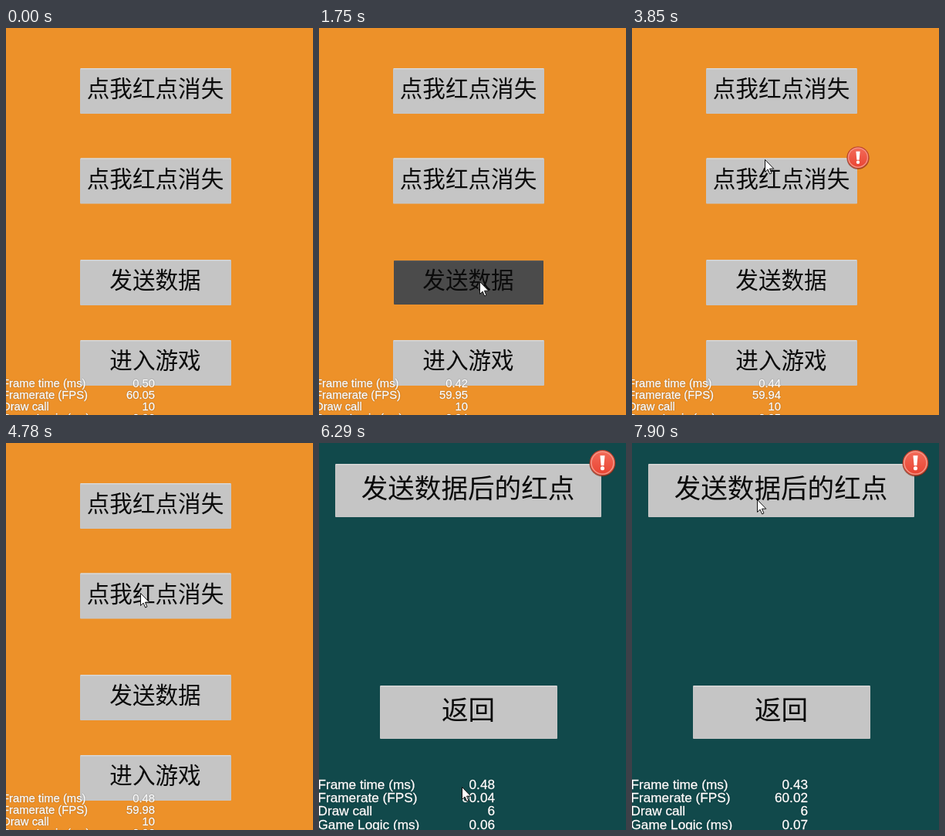
An HTML page with a canvas for the animation above (8 s loop, 398x501 px).

```html
<!DOCTYPE html>
<html lang="zh-CN">
<head>
<meta charset="utf-8">
<style>
html, body { margin: 0; width: 398px; height: 501px; overflow: hidden; }
canvas { display: block; }
</style>
</head>
<body>
<canvas id="stage" width="398" height="501"></canvas>
<script>
const ctx = document.getElementById('stage').getContext('2d');
const LOOP = 8000, GAME_START = 6290;

// Pointer moves: an optional bend curves the way, the pointer rests in between.
const entry = { x: 346, y: 501 };
const moves = [
  { from: 620, to: 1280, x: 208, y: 328 },
  { from: 2190, to: 2960, x: 182, y: 122, bend: { x: 378, y: 190 } },
  { from: 3020, to: 3090, x: 181, y: 85 },
  { from: 3500, to: 3990, x: 170, y: 191 },
  { from: 4730, to: 5600, x: 5, y: 347, bend: { x: 375, y: 330 } },
  { from: 5700, to: 6140, x: 185, y: 445 },
  { from: 6550, to: 6810, x: 270, y: 39 },
  { from: 6940, to: 7140, x: 256, y: 73 },
  { from: 7600, to: 7880, x: 162, y: 73 }
];

const within = (t, from, to) => t >= from && t < to;
const ease = k => k * k * (3 - 2 * k);
const random = seed => {
  const v = Math.sin(seed * 12.9898) * 43758.5453;
  return v - Math.floor(v);
};

function button(x, y, w, h, label, size, pressed) {
  const textX = x + w / 2 - 0.5, textY = y + h / 2 - 3.5 + size * 0.375;
  if (pressed) { x += 1; y += 1; w -= 2; h -= 2; }
  ctx.fillStyle = pressed ? '#4b4b4b' : '#c5c5c5';
  ctx.beginPath();
  ctx.roundRect(x, y, w, h, 1);
  ctx.fill();
  ctx.fillStyle = pressed ? '#555' : '#d8d8d8';
  ctx.fillRect(x + 1, y, w - 2, 1.5);
  ctx.font = `${size}px "Noto Sans CJK SC", "Noto Sans CJK", sans-serif`;
  ctx.textAlign = 'center';
  ctx.fillStyle = '#0b0b0b';
  ctx.fillText(label, textX, textY);
}

function badge(x, y, r) {
  const disc = (radius, fill, cy = 0) => {
    ctx.fillStyle = fill;
    ctx.beginPath();
    ctx.arc(0, cy, radius, 0, 7);
    ctx.fill();
  };
  ctx.save();
  ctx.translate(x, y);
  ctx.scale(r / 15, r / 15);
  const red = ctx.createLinearGradient(0, -12, 0, 12);
  red.addColorStop(0, '#f26a58');
  red.addColorStop(1, '#ea4534');
  disc(14.6, 'rgba(110,40,15,.6)', 0.7);
  disc(14.3, '#c0412f');
  disc(13.2, '#f59484');
  disc(11.8, red);
  ctx.fillStyle = '#fff';
  ctx.beginPath();
  ctx.moveTo(-2.6, -8);
  ctx.lineTo(2.6, -8);
  ctx.lineTo(1.6, 3);
  ctx.lineTo(-1.6, 3);
  ctx.fill();
  disc(2.2, '#fff', 6);
  ctx.restore();
}

function stats(t, left, right, base, pitch, size, drawCalls) {
  const n = Math.floor((t + 180) / 488);
  const rows = [
    ['Frame time (ms)', (0.36 + 0.15 * random(n + 1)).toFixed(2)],
    ['Framerate (FPS)', (59.9 + 0.25 * random(n + 40)).toFixed(2)],
    ['Draw call', drawCalls],
    ['Game Logic (ms)', (0.03 + 0.04 * random(n + 80)).toFixed(2)]
  ];
  const write = (text, x, y) => {
    ctx.strokeText(text, x, y);
    ctx.fillText(text, x, y);
  };
  ctx.save();
  ctx.font = `${size}px "Liberation Sans", Arial, sans-serif`;
  ctx.fillStyle = ctx.strokeStyle = '#fff';
  ctx.lineWidth = 0.35;
  ctx.shadowColor = 'rgba(0,0,0,.3)';
  ctx.shadowBlur = 1.5;
  rows.forEach(([name, value], i) => {
    ctx.textAlign = 'left';
    write(name, left, base + i * pitch);
    ctx.textAlign = 'right';
    write(value, right, base + i * pitch);
  });
  ctx.restore();
}

function pointerAt(t) {
  const i = moves.findLastIndex(m => m.from <= t);
  if (i < 0) return null;
  const end = moves[i], start = moves[i - 1] ?? entry;
  const k = ease(Math.min(1, (t - end.from) / (end.to - end.from)));
  const along = axis => {
    const mid = end.bend?.[axis] ?? (start[axis] + end[axis]) / 2;
    return Math.round((1 - k) ** 2 * start[axis] + 2 * k * (1 - k) * mid + k * k * end[axis]);
  };
  return { x: along('x'), y: along('y') };
}

function pointer(t) {
  const tip = pointerAt(t);
  if (!tip) return;
  ctx.save();
  ctx.translate(tip.x + 0.5, tip.y + 0.5);
  const arrow = new Path2D('M0 0V16L3.6 12.6L6.2 18.5L8.4 17.5L6 11.7H11.3Z');
  ctx.fillStyle = '#fff';
  ctx.fill(arrow);
  ctx.strokeStyle = '#111';
  ctx.stroke(arrow);
  ctx.restore();
}

function lobby(t) {
  const lobbyButton = (y, label, from, to) =>
    button(96, y, 196, 59, label, 29.6, within(t, from, to));
  lobbyButton(52, '点我红点消失', 3190, 3310);
  lobbyButton(168.5, '点我红点消失', 4470, 4590);
  lobbyButton(300, '发送数据', 1750, 1800);
  lobbyButton(404, '进入游戏', 6180, GAME_START);
  if (within(t, 1800, 3310)) badge(293, 50.7, 15);
  if (within(t, 1800, 4590)) badge(293, 167.7, 15);
  stats(t, -5, 193, 465, 15, 14.8, '10');
}

function game(t) {
  button(21, 27, 345, 69, '发送数据后的红点', 34.6, within(t, 7470, 7590));
  button(79, 314, 230, 69, '返回', 34.6, false);
  badge(367.5, 25.7, 17.5);
  stats(t, -1.5, 228, 447.5, 17.4, 17.2, '6');
}

function draw(t) {
  const inGame = t >= GAME_START;
  ctx.fillStyle = inGame ? '#11494b' : '#ed9129';
  ctx.fillRect(0, 0, 398, 501);
  (inGame ? game : lobby)(t);
  pointer(t);
}

let start;
function tick(now) {
  start ??= now;
  draw((now - start) % LOOP);
  requestAnimationFrame(tick);
}
requestAnimationFrame(tick);
</script>
</body>
</html>
```
